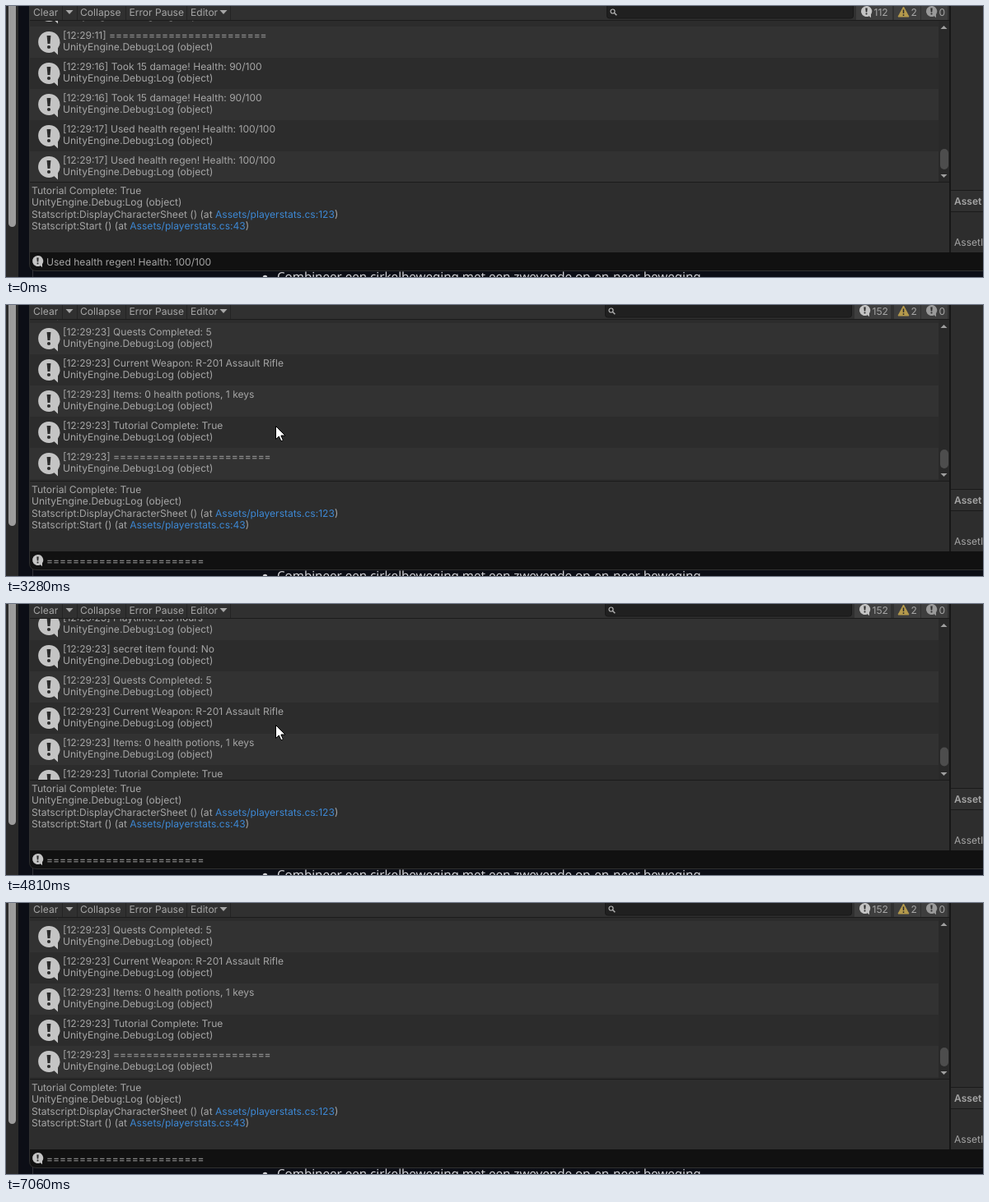
Recreate the animation shown at these times as an HTML page. Size 1186 by 330 pixels, loop 7.99 s.

```html
<!DOCTYPE html>
<html lang="en">
<head>
<meta charset="utf-8">
<style>
html, body { margin: 0; width: 100%; height: 100%; overflow: hidden; background: #0c0e16; }
svg { display: block; width: 1186px; height: 330px; text-rendering: geometricPrecision; }
text { font: 12.07px Inter, Roboto, sans-serif; fill: #a6a6a6; white-space: pre; }
.link { fill: #3d88d4; }
.bold { font-weight: 600; }
.page { font: 15.15px "Noto Sans", "Open Sans", sans-serif; fill: #d2d2d6; }
</style>
</head>
<body>
<svg viewBox="0 0 1186 330" xmlns="http://www.w3.org/2000/svg">
  <defs>
    <clipPath id="listClip"><rect x="29" y="18" width="1103" height="196"/></clipPath>
    <g id="bubble">
      <path d="M13 0A13 13 0 1 0 19.5 24.3L24 28.5V20.5A13 13 0 0 0 13 0Z"/>
      <path d="M10.6 5h4.8l-.9 10h-3z" fill="#2b2b2b"/>
      <circle cx="13" cy="19" r="2.1" fill="#2b2b2b"/>
    </g>
    <path id="down" d="M0 0h9l-4.5 5z" fill="#a6a6a6"/>
  </defs>

  <!-- page behind the editor -->
  <rect width="1186" height="330" fill="#0c0e16"/>
  <rect width="15" height="330" fill="#2a2a2a"/>
  <rect x="3" y="-10" width="9" height="279" rx="4.5" fill="#9c9c9c"/>
  <rect x="32" y="320" width="1" height="10" fill="#33343a"/>
  <circle cx="314.5" cy="330.5" r="2.8" fill="#d2d2d6"/>
  <text class="page" x="329" y="335">Combineer een cirkelbeweging met een zwevende op-en-neer beweging</text>

  <!-- editor window -->
  <path d="M28 0H1186V322.5H37Q28 322.5 28 314Z" fill="#111"/>
  <path d="M28.5 0V314Q28.5 322.5 37 322.5H1186" fill="none" stroke="#303030"/>
  <rect x="29" width="1157" height="300" fill="#2d2d2d"/>
  <rect x="29" width="1116" height="17" fill="#303030"/>
  <rect x="29" y="17" width="1116" height="1" fill="#1c1c1c"/>

  <g id="rows" clip-path="url(#listClip)"></g>
  <rect x="1132" y="18" width="13" height="196" fill="#292929"/>
  <path d="M1134.5 28h8l-4-4zM1134.5 205h8l-4 4z" fill="#a0a0a0"/>
  <rect id="thumb" x="1134" width="10" rx="5" fill="#4d4d4d"/>
  <rect x="29" y="214" width="1116" height="1" fill="#1b1b1b"/>

  <path d="M68.5 0V17M86.5 0V17M145.5 0V17M219.5 0V17M272.5 0V17" stroke="#242424"/>
  <text x="33" y="11.5">Clear</text>
  <use href="#down" x="72.5" y="5"/>
  <text x="90" y="11.5">Collapse</text>
  <text x="149.5" y="11.5">Error Pause</text>
  <text x="224" y="11.5">Editor</text>
  <use href="#down" x="259.5" y="5"/>
  <g id="search">
    <rect x="729.5" y="-5" width="299" height="20" rx="3" fill="#202020" stroke="#181818"/>
    <circle cx="736.5" cy="6.5" r="2.5" fill="none" stroke="#b4b4b4" stroke-width="1.2"/>
    <path d="M738.3 8.3l3 3" stroke="#b4b4b4" stroke-width="1.4"/>
    <rect x="1032" width="44" height="17" fill="#3e3e3e"/>
    <use href="#bubble" transform="translate(1038 0) scale(.5)" fill="#c4c4c4"/>
    <text id="count" x="1053.5" y="11.5"></text>
  </g>
  <rect x="1078" width="32" height="17" fill="#3e3e3e"/>
  <rect x="1111" width="32" height="17" fill="#3e3e3e"/>
  <path d="M1089.5 1l6.5 12h-13z" fill="#b59a4c" stroke="#b59a4c" stroke-linejoin="round"/>
  <path d="M1089.5 4.5v4.5M1089.5 10.3v1.7" stroke="#2b2b2b" stroke-width="1.5"/>
  <text x="1098.5" y="11.5">2</text>
  <use href="#bubble" transform="translate(1117 0) scale(.5)" fill="#9a9a9a"/>
  <text x="1132.5" y="11.5">0</text>

  <text x="31" y="228.5">Tutorial Complete: True</text>
  <text x="31" y="243">UnityEngine.Debug:Log (object)</text>
  <text x="31" y="257.5">Statscript:DisplayCharacterSheet () (at <tspan class="link">Assets/playerstats.cs:123</tspan>)</text>
  <text x="31" y="272">Statscript:Start () (at <tspan class="link">Assets/playerstats.cs:43</tspan>)</text>

  <rect x="1145" width="2" height="300" fill="#171717"/>
  <rect x="1147" y="224" width="39" height="27" fill="#303030"/>
  <path d="M1147 224.5h39M1147 250.5h39" stroke="#1b1b1b"/>
  <text class="bold" x="1151" y="241.5">Asset</text>
  <text x="1151" y="291.5">AssetI</text>

  <use href="#bubble" transform="translate(32 304) scale(.5)" fill="#c4c4c4"/>
  <text id="status" x="49" y="315.5"></text>

  <path id="cursor" d="M.5 .5V16.5L4.3 13L6.9 18.8L9.4 17.7L6.9 12H12Z" fill="#fff" stroke="#000"/>
</svg>
<script>
const LOOP = 7990, RESTART = 2330, SETTLE = 3280;
const ROW = 38, NOTCH = 60, TICK = 1000 / 15;
const $ = id => document.getElementById(id);
const rule = '='.repeat(24);

const before = [
  '[12:29:11] Tutorial Complete: True',
  '[12:29:11] ' + rule,
  '[12:29:16] Took 15 damage! Health: 90/100',
  '[12:29:16] Took 15 damage! Health: 90/100',
  '[12:29:17] Used health regen! Health: 100/100',
  '[12:29:17] Used health regen! Health: 100/100'
];
const after = [
  rule, 'Level: 1', 'Health: 100/100', 'Speed: 5.5 | Critical Chance: 10%', 'Mana: 50',
  'Attack: 50 | Defense: 70', 'Jumpkitstatus: 3', 'Current Ammo: 130', 'Experience: 0 XP',
  'Gold: 150 coins', 'Playtime: 2.5 hours', 'secret item found: No', 'Quests Completed: 5',
  'Current Weapon: R-201 Assault Rifle', 'Items: 0 health potions, 1 keys',
  'Tutorial Complete: True', rule
].map(line => '[12:29:23] ' + line);

// Each spin of the mouse wheel: positive notches scroll up the log.
const spins = [
  { start: 3640, end: 3960, notches: 5 },
  { start: 4205, end: 4465, notches: 2 },
  { start: 4600, end: 4820, notches: -6 },
  { start: 5010, end: 5130, notches: -1 },
  { start: 5240, end: 5600, notches: 4 },
  { start: 6040, end: 6400, notches: -4 }
];
const glides = [
  { start: 66, end: 270, from: [832, 308], to: [1101, 2] },
  { start: 2930, end: 3200, from: [560, 2], to: [327, 147] },
  { start: 5600, end: 5890, from: [327, 147], to: [283, 128] },
  { start: 6370, end: 6850, from: [283, 128], to: [399, 98] },
  { start: 6850, end: 6990, from: [399, 98], to: [415, 51] }
];

const progress = (t, { start, end }) => Math.min(1, Math.max(0, (t - start) / (end - start)));
const easeOut = p => p * (2 - p);
const between = (t, start, end) => t >= start && t < end;

function scrollAt(t) {
  if (t < SETTLE) return 3;
  return NOTCH * spins.reduce((sum, spin) => sum + Math.round(spin.notches * progress(t, spin)), 0);
}

function cursorAt(t) {
  if (!between(t, 70, 330) && !between(t, 2930, 7060)) return null;
  const glide = glides.findLast(({ start }) => start <= t);
  const p = easeOut(progress(Math.floor(t / TICK) * TICK, glide));
  return glide.from.map((a, i) => Math.round(a + (glide.to[i] - a) * p));
}

function buildLog(lines) {
  const log = document.createElementNS('http://www.w3.org/2000/svg', 'g');
  log.innerHTML = lines.map((line, i) => {
    const fromEnd = lines.length - i;
    const shade = fromEnd % 2 ? '#323232' : '#2c2c2c';
    return `<g transform="translate(0 ${-fromEnd * ROW})">
      <rect x="29" width="1103" height="${ROW}" fill="${shade}"/>
      <use href="#bubble" x="39" y="6" fill="#c4c4c4"/>
      <text x="69" y="14.5">${line}</text>
      <text x="69" y="29">UnityEngine.Debug:Log (object)</text></g>`;
  }).join('');
  $('rows').append(log);
  return log;
}
const oldLog = buildLog(before), newLog = buildLog(after);

function draw(t) {
  const restarted = t >= RESTART;
  const scroll = scrollAt(t);
  oldLog.style.display = restarted ? 'none' : '';
  newLog.style.display = restarted ? '' : 'none';
  (restarted ? newLog : oldLog).setAttribute('transform', `translate(0 ${212 + scroll})`);

  $('thumb').setAttribute('y', restarted ? 176 - scroll * 0.0255 : 174);
  $('thumb').setAttribute('height', restarted ? 23 : 25);
  $('search').setAttribute('transform', `translate(${restarted ? -2 : 0} 0)`);
  $('count').textContent = restarted ? '152' : '112';
  $('status').textContent = restarted ? rule : 'Used health regen! Health: 100/100';

  const tip = cursorAt(t);
  $('cursor').style.display = tip ? '' : 'none';
  if (tip) $('cursor').setAttribute('transform', `translate(${tip})`);
}

const begin = performance.now();
function frame() {
  draw((performance.now() - begin) % LOOP);
  requestAnimationFrame(frame);
}
frame();
</script>
</body>
</html>
```
